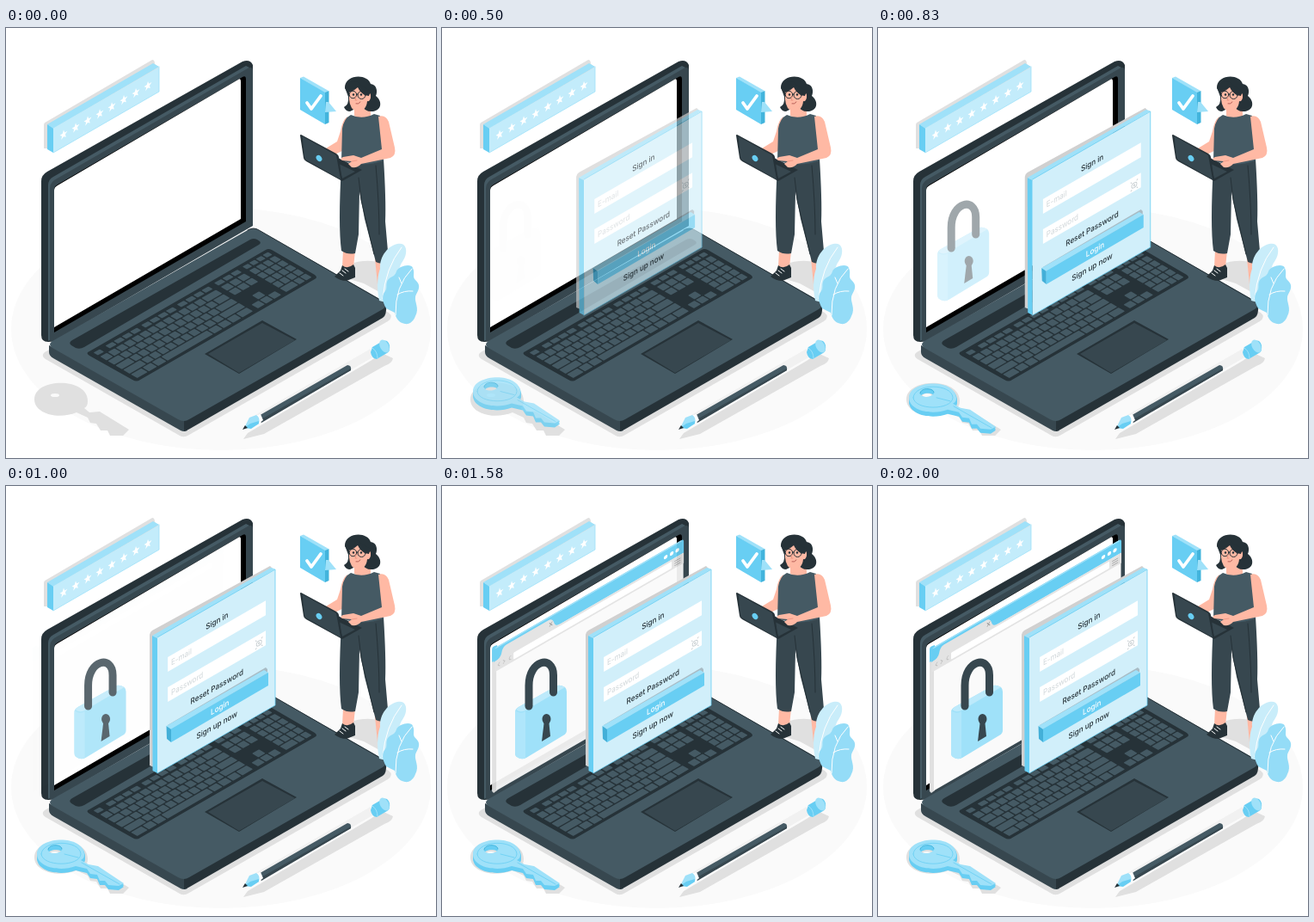
An HTML page for the animation above (2040 ms loop, 500x500 px).

```html
<!DOCTYPE html>
<html lang="en">
<head>
<meta charset="utf-8">
<title>Sign in</title>
<style>
html, body { margin: 0; width: 100%; height: 100%; overflow: hidden; background: #fff; }
svg { display: block; width: 100vw; height: 100vh; }
text { font: 500 9.3px Inter, Roboto, sans-serif; fill: #263238; }
.mid { text-anchor: middle; }
.hint { font-weight: 400; fill: #cfd6d9; }
.ink { fill: #263238; }
.dark { fill: #37474f; }
.slate { fill: #455a64; }
.blue { fill: #68cef3; }
.sky { fill: #9fe1f9; }
.pale { fill: #d1effa; }
.shade { fill: #e0e0e0; }
.skin { fill: #ffb9a4; }
.white { fill: #fff; }
.line { fill: none; stroke-linecap: round; stroke-linejoin: round; }
</style>
</head>
<body>
<svg viewBox="0 0 500 500">
<ellipse cx="250" cy="350" rx="244" ry="141" fill="#fafafa"/>

<!-- ground shadows -->
<g class="shade">
  <path d="M45 377Q40 381 46 385L202 474Q207 477 213 473L444 341Q451 336 445 331L290 240Z"/>
  <path d="M383 287L398 275Q420 267 440 274L452 290 436 308 416 297Z"/>
  <path d="M276 478L281 471 424 387 437 378 450 384Q449 390 440 393L300 472Z"/>
  <path fill-rule="evenodd" d="M33 432C33 406 96 406 95 434Q95 440 91 442L97 447 109 446 143 467 136 474 121 474 118 468 110 468 105 460 98 459 95 453 82 447C60 456 33 448 33 432ZM52 427A5 2 0 0 0 62 427A5 2 0 0 0 52 427Z"/>
</g>

<!-- password bar -->
<path class="shade" d="M44 113Q44 110 47 109L170 37Q173 37 173 42L178 46 55 140 44 140Z"/>
<path class="blue" d="M48 112L55 116V145L48 141Z"/>
<path class="sky" d="M48 112L171 41 178 45 55 117Z"/>
<path fill="#c3ecfb" d="M55 116.500L178 45.500V74L55 145Z"/>
<path class="line" stroke="#9fe1f9" stroke-width=".8" d="M178 45V74L55 145"/>
<g id="stars" class="white"></g>

<!-- laptop lid -->
<path class="ink" d="M41 178Q41 171 48 167L275 39Q284 36 287 43V227L56 364Q41 368 41 357Z"/>
<path class="dark" d="M50 186Q50 180 55 177L281 47Q287 44 287 50V230L56 364Q50 366 50 360Z"/>
<path class="slate" d="M49 183Q49 176 55 173L279 44 283 46 56 177Q51 181 51 187V363L49 364Z"/>
<path d="M56 188Q56 184 60 182L275 57Q279 55 279 59V225L56 354Z"/>
<path class="white" d="M56 189Q56 185 60 183L270 60Q273 58 273 62V222L56 348Z"/>

<!-- laptop base -->
<path class="dark" d="M50 369V377Q50 381 55 384L203 468Q207 470 211 468L207 452Z"/>
<path class="ink" d="M207 452V469L212 467 438 337Q443 334 442 322Z"/>
<path class="slate" d="M54 364L281 235Q288 231 294 235L438 317Q445 322 438 327L213 455Q207 459 200 455L54 372Q48 368 54 364Z"/>
<path class="line" stroke="#263238" d="M281 235Q288 231 294 235L440 319"/>
<path class="ink" d="M77 363L284 246Q288 244 292 246L295 248Q297 250 294 252L91 371Q86 374 81 372L76 369Q72 366 77 363Z"/>
<path class="ink" d="M97 376L302 258Q305 256 309 258L359 287Q363 290 359 292L156 409Q152 412 147 409L97 381Q92 378 97 376Z"/>
<g id="keys" class="slate" transform="matrix(.866 -.5 .866 .5 94 378)"></g>
<path class="ink" d="M231 379L298 340 338 362 271 402Z"/>
<path class="dark" d="M235 379L298 343 336 363 271 401Z"/>

<!-- pen -->
<path fill="#f1f1f1" d="M290 450L424 373 428 382 294 459Z"/>
<path class="slate" d="M292 452L397 392Q402 392 401 398L297 458Z"/>
<path class="dark" d="M295 456L401 396V398L297 459Z"/>
<path class="white" d="M290 451L296 449 299 456 294 460Z"/>
<path class="sky" d="M277 465L283 453 291 450Q296 453 294 460L285 465Z"/>
<path class="blue" d="M277 465L284 460 294 457V460L285 466Z"/>
<path class="ink" d="M275 467L278 462 281 465Z"/>
<path class="blue" d="M426 371L438 364Q444 362 446 369 447 376 443 378L431 385Q425 384 424 377Z"/>
<ellipse class="sky" cx="440" cy="370" rx="5" ry="8" transform="rotate(-30 440 370)"/>
<path class="line" stroke="#9fe1f9" d="M426 372Q432 376 432 384"/>

<!-- speech bubble -->
<path class="sky" d="M342 58L346 56.500 375 73 371 76Z"/>
<path fill="#42b4dc" d="M371 75L375.500 73V110L371 112Z"/>
<path class="blue" d="M342 58L371 75V112L342 95Z"/>
<path class="sky" d="M372 86L375 86 384 97 371 98Z"/>
<path class="line" stroke="#fff" stroke-width="3.800" d="M350 87L355 94 366 79"/>

<!-- woman -->
<path class="skin" d="M392 259H406L404 278H391ZM429 268H441L440 298H432Z"/>
<path class="ink" d="M391 276Q397 281 404 275L406 279V290L396 294Q388 294 382 289L389 282Z"/>
<path class="line" stroke="#fff" d="M388 285L392 288M391 282L395 285M394 280L398 283"/>
<path class="dark" d="M390 160L439 152Q442 200 441 225L445 271Q437 276 430 272L417 222 411 190 410 240 406 262Q397 264 390 259Q386 230 390 160Z"/>
<path class="line" stroke="#263238" d="M410 174L413 200 428 263M430 160Q434 205 434 240"/>
<path class="skin" d="M397 103Q391 107 389 120L385 132 372 140 378 149 393 142Z"/>
<path class="skin" d="M405 93L424 90V102Q414 109 405 102Z"/>
<path class="slate" d="M401 101Q414 107 428 100L435 102 439 154Q414 163 390 154L391 117Q393 105 401 101Z"/>
<path class="ink" d="M394 69C394 54 420 52 424 65C432 66 432 75 430 79C437 84 438 95 427 97Q417 98 414 90L400 97Q395 97 393 92Q399 89 398 80Z"/>
<path class="skin" d="M399 73Q405 69 410 66Q415 72 420 74Q425 75 424 81Q423 86 420 85Q419 97 408 97Q400 95 399 83Z"/>
<path class="ink" d="M394 70Q397 60 409 63Q417 70 424 73L422 79 417 78Q412 75 409 69Q402 75 397 75Z"/>
<g class="line" stroke="#263238">
  <circle cx="403.500" cy="77.500" r="4.200"/><circle cx="413.500" cy="78" r="4.500"/>
  <path d="M407.500 77H409M418 77L423 76M400 71L404 70M411 71L415 72"/>
  <path stroke="#b55d55" d="M407 88Q410 89 412 86"/>
  <path stroke="#eb9481" d="M407 80L406 84H408"/>
</g>
<circle class="ink" cx="404" cy="77.500" r="1.200"/><circle class="ink" cx="413" cy="77.500" r="1.200"/>
<path class="ink" d="M386 151L414 165 391 178 374 165Z"/>
<path class="dark" d="M387 158L406 167 391 175Z"/>
<path class="ink" d="M342 125Q342 123 345 125L384 146Q387 148 387 150L391 178 349 155Q346 153 346 151Z"/>
<path class="dark" d="M344.500 126L384 148 389 176 350 154Q348 153 347 150Z"/>
<ellipse class="blue" cx="364" cy="151.500" rx="3" ry="4" transform="rotate(-35 364 151.500)"/>
<path class="skin" d="M433 103Q441 100 445 109L452 139Q454 148 447 151L413 158Q409 163 402 162L398 158 402 155 391 154Q387 152 392 150L404 148 413 151 437 141Z"/>
<path class="line" stroke="#eb9481" stroke-width=".8" d="M402 155L408 154"/>

<!-- leaves -->
<path fill="#c9edfa" d="M434 317C430 298 433 285 435 280C434 265 445 253 455 251C464 249 466 256 465 262C464 270 458 273 457 282C456 288 449 290 450 299L444 320Z"/>
<path class="line" stroke="#fff" d="M460 255Q441 279 438 315"/>
<path fill="#94dcf7" d="M442 326C437 317 437 310 441 306C444 302 441 298 444 293C448 288 452 290 454 283C456 277 471 273 473 279C476 285 472 289 476 293C485 301 477 307 476 313C475 319 481 326 476 335C474 341 469 345 464 344C456 343 453 336 452 331Z"/>
<path class="line" stroke="#fff" d="M472 280Q452 300 453 334M455 310Q463 305 473 306M460 297L457 290"/>

<!-- browser window -->
<g id="browser">
  <path class="shade" d="M60 192L62 189 66 190V354L62 357 60 355Z"/>
  <path class="blue" d="M60 190Q60 187 63 186L66 185V201L60 205Z"/>
  <g transform="matrix(1 -.577 0 1 62 189)">
    <path fill="#fafafa" d="M3 12H220.500V167H3Z"/>
    <path class="blue" d="M1 1Q2 0 4 0H218Q221 0 221 3V16H0Z"/>
    <path class="sky" d="M1 1Q2 0 4 0H218L219 1.500H4Z"/>
    <path fill="#e3e3e3" d="M1 16Q8 16 9 11 10 4 15 4H64Q68 4 70 10 71 16 78 16H221V28H1Z"/>
    <rect class="white" x="23" y="18" width="184" height="8" rx="1"/>
    <g class="white"><circle cx="200" cy="9" r="2.200"/><circle cx="207" cy="9" r="2.200"/><circle cx="213.500" cy="9" r="2.200"/></g>
    <path class="line" stroke="#999" stroke-width=".8" d="M65 8L68 12M68 8L65 12M210.500 20H217M210.500 22.500H217M210.500 25H217"/>
    <path class="line" stroke="#bbb" stroke-width=".8" d="M7 20L5 22 7 24M11 20L13 22 11 24M20 20A2 2 0 1 0 20 24"/>
  </g>
</g>

<!-- padlock -->
<g id="lock">
  <path class="sky" d="M85 263Q85 259 89 257L134 232Q138 231 143 234 145 236 145 239V284Q145 288 141 290L98 316Q93 319 87 315 85 314 85 310Z"/>
  <path fill="#bdeafb" d="M86 260L89 257 134 232Q138 231 143 234L97 261Q91 264 86 260Z"/>
  <path fill="#afe6fb" d="M85 261Q91 266 97 262V316Q92 319 87 315 85 314 85 310Z"/>
  <path class="line" stroke="#37474f" stroke-width="9" stroke-linecap="butt" d="M101 256V232C101 202 129.500 196 129.500 220V240"/>
  <path class="dark" d="M96.500 255Q101 261 105.500 255ZM125 239Q130 244 134 239Z"/>
  <ellipse class="dark" cx="121.500" cy="271" rx="5" ry="6"/>
  <path class="dark" d="M119 272L124 271 126 291 116 297Z"/>
</g>

<!-- sign-in panel -->
<g id="panel">
  <path fill="#d0d0d0" d="M167 173Q167 170 170 168L307 93 311 97 172 180 172 327 167 325Z"/>
  <path class="blue" d="M170 174L176 177V334L170.500 331Z"/>
  <path class="sky" d="M170 174L308 95 313 96.500 176 177Z"/>
  <path class="pale" d="M176 176L313 97V255L176 334Z"/>
  <path class="line" stroke="#68cef3" stroke-width=".8" d="M176 176L313 97V255L176 334"/>
  <path fill="#a9bcc5" d="M188 278L302 211 304 213 304 218 190 284Z"/>
  <path fill="#43afd8" d="M186.500 279L192 282V298L187 294Z"/>
  <path class="sky" d="M186.500 279L300 214 305 217 192 283Z"/>
  <path class="blue" d="M192 282.500L305 217V232L192 298Z"/>
  <g transform="matrix(.866 -.5 0 1 176 175)">
    <path class="white" d="M14 31H145.500V48H14ZM14 66H145.500V83H14Z"/>
    <text class="mid" x="80" y="25">Sign in</text>
    <text class="hint" x="18.500" y="43">E-mail</text>
    <text class="hint" x="18.500" y="78">Password</text>
    <g class="line" stroke="#c7ced1"><ellipse cx="136.500" cy="76" rx="3.500" ry="2.800"/><circle cx="136.500" cy="76" r=".7"/><path d="M133 72L132 71M140 72L141 71M133 80L132 81M140 80L141 81"/></g>
    <text class="mid" x="80" y="101.500">Reset Password</text>
    <text class="mid white" x="84" y="127.500">Login</text>
    <text class="mid" x="80" y="146">Sign up now</text>
  </g>
</g>

<!-- key -->
<g id="key">
  <path id="keyBody" class="blue" fill-rule="evenodd" d="M36 430C36 408 92 406 92 431Q92 435 88 437L96 442 107 444 137 463 131 467 119 466 115 461 109 461 106 454 98 453 94 447 81 444C62 451 36 445 36 430ZM49 425C49 431 65 430 65 424C65 418 49 419 49 425Z"/>
  <use href="#keyBody" y="1.500"/><use href="#keyBody" y="3"/>
  <path class="sky" fill-rule="evenodd" d="M36 428C36 407 91 405 91 429Q91 433 87 435L96 440 107 442 137 462 131 465 119 464 115 459 109 459 106 452 98 451 94 445 81 442C62 449 36 443 36 428ZM49 423C49 429 65 428 65 422C65 416 49 417 49 423Z"/>
  <path class="line" stroke="#68cef3" stroke-width=".8" d="M41 428C42 411 86 411 87 428C86 443 42 443 41 428M88 438L132 463M68 428L84 432"/>
  <path class="line" stroke="#42b4dc" d="M49 423C49 416 65 416 65 422"/>
</g>
</svg>
<script>
const $ = id => document.getElementById(id);

// password stars
let d = "";
for (let i = 0; i < 8; i++) {
  for (let k = 0; k < 10; k++) {
    const a = k * Math.PI / 5, r = k % 2 ? 2.3 : 5.4;
    const x = Math.sin(a) * r * .866;
    d += `${k ? "L" : "M"}${67 + i * 14 + x} ${124 - i * 8.1 - Math.cos(a) * r - x * .577}`;
  }
  d += "Z";
}
$("stars").innerHTML = `<path d="${d}"/>`;

// keyboard: each row is a list of key widths between two edges
let caps = "";
function row(from, to, y, h, widths) {
  const unit = (to - from) / widths.reduce((a, b) => a + b);
  for (const w of widths) {
    caps += `<rect x="${from + .8}" y="${y}" width="${w * unit - 1.6}" height="${h}" rx="1"/>`;
    from += w * unit;
  }
}
const ones = n => Array(n).fill(1);
const main = [
  [...ones(13), 2], [1.5, ...ones(12), 1.5], [1.8, ...ones(11), 2.2],
  [2.3, ...ones(10), 2.7], [1.5, 1.2, 1.2, 6, 1.2, 1.2, 1.2, 1.5]
];
row(4, 14, 4, 6, [1]);
[20, 68, 116].forEach(x => row(x, x + 44, 4, 6, ones(4)));
row(166, 199, 4, 6, ones(3));
row(204, 240, 4, 6, ones(4));
main.forEach((widths, i) => {
  const y = 13 + i * 10.3;
  row(4, 161, y, 8.7, widths);
  if (i < 2 || i == 4) row(166, 199, y, 8.7, ones(3));
  if (i == 3) row(177, 188, y, 8.7, [1]);
  row(204, 240, y, 8.7, i == 4 ? [2, 1, 1] : ones(4));
});
$("keys").innerHTML = caps;

// cubic-bezier(.36, -.01, .5, 1.38)
function ease(x) {
  if (x <= 0) return 0;
  if (x >= 1) return 1;
  const curve = (t, a, b) => 3 * t * (1 - t) * ((1 - t) * a + t * b) + t ** 3;
  let lo = 0, hi = 1;
  for (let i = 0; i < 24; i++) {
    const m = (lo + hi) / 2;
    curve(m, .36, .5) < x ? lo = m : hi = m;
  }
  return curve(lo, -.01, 1.38);
}

function enter(id, progress, dx, dy, fade = progress) {
  const left = 1 - progress;
  $(id).setAttribute("transform", `translate(${dx * left} ${dy * left})`);
  $(id).setAttribute("opacity", Math.min(1, Math.max(0, fade)));
}

function draw(now) {
  const t = now % 2040;
  const first = t < 80 ? 0 : ease((t + 40) / 1000);
  enter("panel", first, -60, 0, first * first);
  enter("key", first, 0, -30);
  enter("lock", ease((t - 460) / 1000), -30, 0);
  enter("browser", ease((t - 960) / 1000), -30, 0);
}

const start = performance.now();
function tick() {
  draw(performance.now() - start);
  requestAnimationFrame(tick);
}
tick();
</script>
</body>
</html>
```
